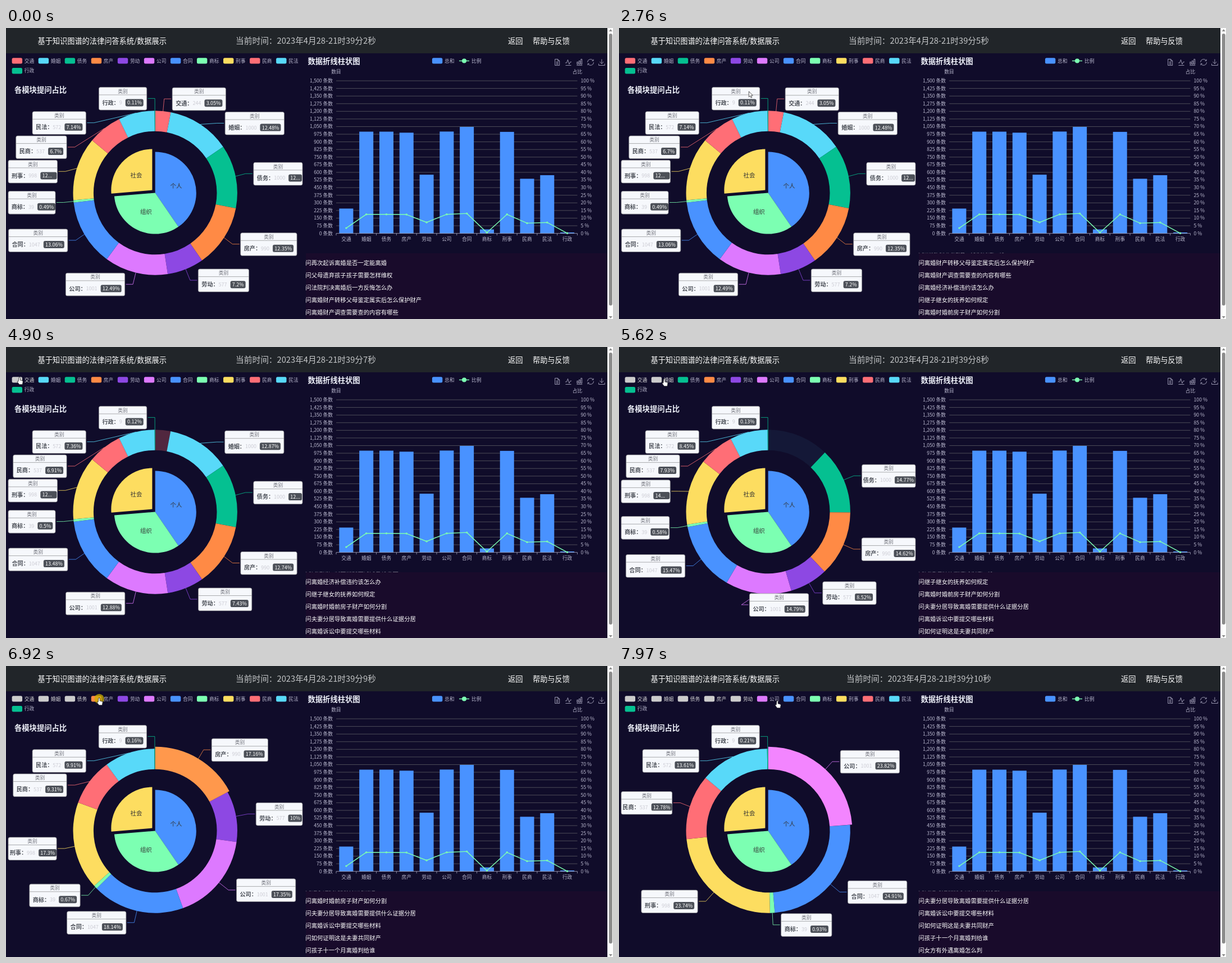
An HTML page for the animation above (8000 ms loop, 1081 by 518 pixels).

```html
<!DOCTYPE html>
<html lang="zh-CN">
<head>
<meta charset="utf-8">
<title>数据展示</title>
<style>
html, body { margin: 0; width: 100%; height: 100%; overflow: hidden; background: #100c2a; }
svg { display: block; width: 1081px; height: 518px; font-family: "Noto Sans CJK SC", "Noto Sans CJK", "Noto Sans", sans-serif; }
</style>
</head>
<body>
<svg id="stage" viewBox="0 0 1081 518">
  <defs><clipPath id="listClip"><rect x="530" y="400.5" width="540" height="118"/></clipPath></defs>
  <g id="base"></g>
  <g id="list" clip-path="url(#listClip)"></g>
  <g id="legend"></g>
  <g id="pie"></g>
  <text id="clock" x="534" y="28.4" font-size="14.7" fill="#c4c6c8" text-anchor="middle"></text>
  <g id="over"></g>
</svg>
<script>
const LOOP = 8000;
const names = '交通 婚姻 债务 房产 劳动 公司 合同 商标 刑事 民商 民法 行政'.split(' ');
const counts = [244, 1000, 1000, 990, 577, 1001, 1047, 39, 998, 537, 572, 9];
const [BLUE, MINT, YELLOW, RED, CYAN, GREEN, ORANGE, PURPLE, PINK] =
  '#4992ff #7cffb2 #fddd60 #ff6e76 #58d9f9 #05c091 #ff8a45 #8d48e3 #dd79ff'.split(' ');
const colors = [RED, CYAN, GREEN, ORANGE, PURPLE, PINK, BLUE, MINT, YELLOW, RED, CYAN, GREEN];
const AXIS = '#b9b8ce';
const questions = [
  '问再次起诉离婚是否一定能离婚', '问父母遗弃孩子孩子需要怎样维权', '问法院判决离婚后一方反悔怎么办',
  '问离婚财产转移父母鉴定属实后怎么保护财产', '问离婚财产调查需要查的内容有哪些', '问离婚经济补偿违约该怎么办',
  '问继子继女的抚养如何规定', '问离婚时婚前房子财产如何分割', '问夫妻分居导致离婚需要提供什么证据分居',
  '问离婚诉讼中要提交哪些材料', '问如何证明这是夫妻共同财产', '问孩子十一个月离婚判给谁', '问女方有外遇离婚怎么判'
];

const $ = id => document.getElementById(id);
const n2 = v => Math.round(v * 100) / 100;
const clamp = (v, a = 0, b = 1) => Math.min(b, Math.max(a, v));
const mix = (a, b, e) => a + (b - a) * e;
const inOut = p => p < .5 ? 4 * p ** 3 : 1 - (2 - 2 * p) ** 3 / 2;
const sum = list => list.reduce((a, b) => a + b, 0);

// Text placed by the vertical middle of its glyphs
const text = (x, y, size, str, fill, more = '') =>
  `<text x="${n2(x)}" y="${n2(y + size * .37)}" font-size="${size}" fill="${fill}" ${more}>${str}</text>`;
const rect = (x, y, w, h, fill, more = '') =>
  `<rect x="${n2(x)}" y="${n2(y)}" width="${n2(w)}" height="${n2(h)}" fill="${fill}" ${more}/>`;
const line = (pts, color, w = .72, more = '') =>
  `<polyline points="${pts.map(p => p.map(n2)).join(' ')}" fill="none" stroke="${color}" stroke-width="${w}" ${more}/>`;
const MID = 'text-anchor="middle"', END = 'text-anchor="end"', BOLD = 'font-weight="700"';

// ---- pie geometry, angles clockwise from the top ----
const CX = 265.7, CY = 293.5, R0 = 109.8, R1 = 146.2, LEN1 = 21.6, LEN2 = 10.8, GAP = 3.6;
const polar = (r, a) => [CX + r * Math.sin(a), CY - r * Math.cos(a)];

function sector(r0, r1, a0, a1, fill, more = '') {
  const big = a1 - a0 > Math.PI ? 1 : 0, pt = (r, a) => polar(r, a).map(n2).join(' ');
  return `<path d="M${pt(r1, a0)}A${r1} ${r1} 0 ${big} 1 ${pt(r1, a1)}L${pt(r0, a1)}` +
    (r0 ? `A${r0} ${r0} 0 ${big} 0 ${pt(r0, a0)}` : '') + `Z" fill="${fill}" ${more}/>`;
}

// Percentages with two decimals that add up to 100 (largest remainder)
function percents(values) {
  const total = sum(values), raw = values.map(v => v / total * 1e4), seats = raw.map(Math.floor);
  raw.map((v, i) => [v - seats[i], i]).sort((a, b) => b[0] - a[0])
    .slice(0, 1e4 - sum(seats)).forEach(([, i]) => seats[i]++);
  return seats.map(v => v / 100);
}

// Sector angles and label anchors once the first `off` categories are hidden
function layout(off) {
  const shown = counts.slice(off), total = sum(shown), pct = percents(shown), items = [];
  let a = 0;
  for (let i = off; i < 12; i++) {
    const a1 = a + counts[i] / total * 2 * Math.PI, mid = (a + a1) / 2;
    const dir = mid < Math.PI ? 1 : -1, [x, y] = polar(R1 + LEN1, mid);
    items[i] = { a0: a, a1, dir, x: x + dir * (LEN2 + GAP), y, pct: pct[i - off] };
    a = a1;
  }
  [1, -1].forEach(dir => spread(items.filter(it => it.dir === dir), dir));
  return items;
}

// Push overlapping labels down, then realign them on an ellipse
function spread(side, dir) {
  let moved = false, last = -99;
  side.sort((p, q) => p.y - q.y).forEach(it => {
    if (it.y < last + 43.3) { it.y = last + 43.3; moved = true; }
    last = it.y;
  });
  if (!moved) return;
  const rA = R1 + LEN1;
  [it => it.y <= CY, it => it.y > CY].forEach(half => {
    const part = side.filter(half);
    if (!part.length) return;
    const far = part.reduce((p, q) => Math.abs(q.y - CY) > Math.abs(p.y - CY) ? q : p);
    const dx = Math.abs(far.x - CX) - LEN2, dy = Math.abs(far.y - CY);
    const rB = dx < rA ? dy / Math.sqrt(1 - (dx / rA) ** 2) : rA;
    part.forEach(it => {
      const k = Math.max(0, 1 - ((it.y - CY) / rB) ** 2);
      it.x = CX + dir * (Math.sqrt(k) * rA + LEN2);
    });
  });
}

const layouts = [0, 1, 2, 3, 4, 5].map(layout);
const clicks = [4830, 5500, 6290, 7000, 7470];
// category, start, end
const hovers = [[0, 1560, 1700], [0, 4450, 4780], [1, 5200, 5500], [2, 5750, 6290], [3, 6600, 7000], [4, 7220, 7470], [5, 7640, 9000]];

const lift = (hex, k) => 'rgb(' + [1, 3, 5].map(p =>
  Math.min(255, Math.round(parseInt(hex.slice(p, p + 2), 16) * (1 + .1 * k)))) + ')';

function hoverAmount(i, t) {
  let amount = 0;
  hovers.forEach(([k, on, off]) => {
    if (k !== i || t < on) return;
    const rise = 1 - (1 - clamp((Math.min(t, off) - on) / 300)) ** 3;
    amount = Math.max(amount, rise * (1 - clamp((t - off) / 300)) ** 3);
  });
  return amount;
}

const glyphs = { '.': 2.5, '%': 8.1 };
const width = str => sum([...str].map(c => glyphs[c] || 5));

function label(i, it) {
  const pad = 6, nameW = 30.3, value = '' + counts[i];
  let per = it.pct + '%', perW = width(per) + 6.4, shift = 0;
  const full = pad * 3 + nameW + width(value) + perW;
  const room = it.dir > 0 ? 528 - it.x : it.x - 4, w = Math.min(full, room);
  const over = full - pad - w;
  if (over > 4) { per = per.slice(0, 2) + '...'; perW = w - (full - pad - perW) - 1; }
  else if (over > 0) shift = over;
  const x = it.dir > 0 ? it.x : it.x - w, y = it.y - 20.3;
  const nx = x + pad - shift, vx = nx + nameW, px = vx + width(value) + pad;
  return rect(x, y, w, 40.6, '#f6f8fc', 'rx="2.9" stroke="#8c8d8e" stroke-width=".72"') +
    line([[x, y + 13.6], [x + w, y + 13.6]], '#8c8d8e') +
    text(x + w / 2, y + 7, 8.7, '类别', '#6e7079', MID) +
    text(nx, y + 27.7, 10.1, names[i] + '：', '#4c5058', BOLD) +
    text(vx, y + 27.7, 9, value, '#ccccd4') +
    rect(px, y + 21.1, perW, 13, '#4c5058', 'rx="2.9"') +
    text(px + 3.2, y + 27.7, 9, per, '#fff');
}

function drawPie(t) {
  const k = clicks.filter(c => t >= c).length, since = t - (clicks[k - 1] || -1e4);
  const now = layouts[k], old = layouts[Math.max(0, k - 1)], e = inOut(clamp(since / 500));
  let rings = '', lines = '', labels = '';
  if (k && since < 200)
    rings += sector(R0, R1, old[k - 1].a0, old[k - 1].a1, colors[k - 1], `opacity="${n2((1 - since / 200) ** 3)}"`);
  const order = names.map((_, i) => i).slice(k).sort((a, b) => hoverAmount(a, t) - hoverAmount(b, t));
  order.forEach(i => {
    const a = old[i], b = now[i], h = hoverAmount(i, t);
    const it = { dir: b.dir, pct: b.pct };
    ['a0', 'a1', 'x', 'y'].forEach(p => it[p] = mix(a[p], b[p], e));
    const r = n2(R1 + 3.6 * h);
    rings += sector(R0, r, it.a0, it.a1, lift(colors[i], h));
    lines += line([polar(r, (it.a0 + it.a1) / 2), [it.x - it.dir * (LEN2 + GAP), it.y - .3], [it.x - it.dir * 2, it.y - .3]], colors[i], .8);
    labels += label(i, it);
  });
  $('pie').innerHTML = rings + lines + labels;
}

function drawLegend(off) {
  $('legend').innerHTML = names.map((s, i) => {
    const x = 10.6 + i % 11 * 47.05, y = i < 11 ? 58.3 : 76.2;
    return rect(x, y - 5.1, 18.4, 10.3, i < off ? '#ccc' : colors[i], 'rx="2.5"') +
      text(x + 22.1, y, 8.7, s, i < off ? '#ddd' : AXIS);
  }).join('');
}

function drawList(shift) {
  $('list').innerHTML = questions.map((q, i) =>
    i < shift - 1 || i > shift + 4 ? '' : text(533.3, 418 + 22 * (i - shift), 10.35, q, '#fff')).join('');
}

// ---- pointer ----
const path = [[1000, 420, 535], [1190, 322, 401], [1320, 318, 398], [1630, 35, 60], [1770, 53, 71], [2000, 70, 76],
  [2150, 122, 84], [2650, 235, 112], [3200, 200, 120], [3560, 179, 124], [3730, 167, 205], [3820, 166, 200],
  [4450, 20, 56], [4700, 24, 54], [4950, 24, 54], [5250, 72, 57], [5560, 73, 57], [5800, 121, 57],
  [6350, 121, 57], [6650, 166, 57], [7040, 166, 57], [7280, 213, 58], [7500, 214, 58], [7750, 278, 61], [7970, 282, 62]];
const HAND = 'M-1.2 1q0-1.5 1.2-1.5t1.2 1.5v4l3.9 1q1.3.4 1.1 1.8l-.9 5h-5.6l-3.6-4.9q.1-1.8 1.9-.6z';
const ARROW = 'M0 0v10l2.3-2.1 1.5 3.5 1.6-.7-1.5-3.4h3.1z';
const within = (t, a, b) => t >= a && t < b;

function pointer(t) {
  const i = path.findIndex(p => p[0] > t);
  if (i === 0) return null;
  if (i < 0) return path[path.length - 1].slice(1);
  const [t0, x0, y0] = path[i - 1], [t1, x1, y1] = path[i], p = (t - t0) / (t1 - t0), e = p * p * (3 - 2 * p);
  return [mix(x0, x1, e), mix(y0, y1, e)];
}

function tooltip(t) {
  if (!within(t, 3400, 3960)) return '';
  const i = t < 3760 ? 11 : 9, e = 1 - (1 - clamp((t - 3760) / 400)) ** 3;
  const x = mix(193, 181, e), y = mix(138, 219, e), row = `${names[i]}: ${counts[i]} (${layouts[0][i].pct}%)`;
  const alpha = Math.min(clamp((t - 3400) / 200), clamp((3960 - t) / 100));
  return `<g opacity="${n2(alpha)}">` +
    rect(x, y, i === 11 ? 87 : 93, 46, '#fff', `rx="2.9" stroke="${colors[i]}" stroke-width=".72"`) +
    text(x + 7.2, y + 16.2, 10.1, '类别', '#666') + text(x + 7.2, y + 31.8, 10.1, row, '#666') + '</g>';
}

function drawOver(t) {
  const at = pointer(t);
  let s = tooltip(t);
  if (at) {
    const [x, y] = at.map(n2);
    if (clicks.some(c => within(t, c - 110, c)))
      s += `<circle cx="${x}" cy="${y + 1.5}" r="8.7" fill="#c8ad00" opacity=".75"/>`;
    const hand = within(t, 1560, 1720) || within(t, 3400, 3900) || t > 4430;
    s += `<path d="${hand ? HAND : ARROW}" transform="translate(${x} ${y})" fill="#fff" stroke="#111" stroke-width=".7"/>`;
  }
  $('over').innerHTML = s;
}

// ---- still parts ----
function barChart() {
  const L = 588, W = 429.5, T = 94, B = 365.6, step = W / 12;
  const ratios = percents(counts);
  ratios[0] = 3.5; // the plotted line starts a little above the share in the pie
  let s = '';
  for (let i = 0; i <= 20; i++) {
    const y = B - (B - T) * i / 20;
    if (i) s += line([[L, y], [L + W, y]], '#4d4c58', 1);
    s += text(582, y - .3, 8.7, (i * 75).toLocaleString('en-US') + ' 条数', AXIS, END) +
      text(1023.5, y - .3, 8.7, i * 5 + ' %', AXIS);
  }
  s += text(L, 77.7, 8.7, '数目', AXIS, MID) + text(L + W, 77.7, 8.7, '占比', AXIS, MID);
  const pts = ratios.map((v, i) => [L + step * (i + .5), B - (B - T) * v / 100]);
  counts.forEach((v, i) => {
    const h = (B - T) * v / 1500;
    s += rect(pts[i][0] - 12.5, B - h, 25, h, BLUE) + text(pts[i][0], 375.3, 8.7, names[i], AXIS, MID);
  });
  s += line([[L, B], [L + W, B]], AXIS);
  for (let i = 0; i <= 12; i++) s += line([[L + step * i, B], [L + step * i, B + 3.6]], AXIS);
  s += line(pts, MINT, 1.44, 'stroke-linejoin="bevel"');
  return s + pts.map(([x, y]) => `<circle cx="${n2(x)}" cy="${n2(y)}" r="1.7" fill="${MINT}"/>`).join('');
}

function toolbox() {
  const icons = ['M-4-5.5h5l3 3v8h-8zM1-5.5v3h3M-2-.5h4M-2 1.5h4M-2 3.5h4', 'M-5.5 1h2.5l2-5.5 2.5 8 2-4h2M-5 5.5h10',
    'M-5 5.5h10M-4.5 3.5v-4h2v4zM-1 3.5v-6h2v6zM2.5 3.5v-9h2v9z',
    'M-5.5 0a5.5 5.5 0 0 1 10.2-2.8M5.5 0a5.5 5.5 0 0 1-10.2 2.8M5-5.3v2.7h-2.7M-5 5.3v-2.7h2.7',
    'M0-5.5v8M-3.5-1l3.5 3.6 3.5-3.6M-5.3 2.5v3h10.6v-3'];
  return icons.map((d, i) =>
    `<path d="${d}" transform="translate(${981.7 + i * 19.8} 61)" fill="none" stroke="${AXIS}" stroke-width=".8"/>`).join('');
}

function innerPie() {
  const cut = [0, 145.6, 265.2, 360].map(d => d * Math.PI / 180), r = 73.1;
  return sector(0, r, cut[0], cut[1], BLUE) + sector(0, r, cut[1], cut[2], MINT) +
    sector(0, r, cut[2], cut[3] - 1e-4, YELLOW, 'transform="translate(-5.3 -4.9)"') +
    text(303, 281, 10.4, '个人', '#333', MID) + text(249.3, 327, 10.4, '组织', '#333', MID) +
    text(232, 262, 10.4, '社会', '#333', MID);
}

$('base').innerHTML =
  rect(0, 0, 1081, 518, '#100c2a') + rect(0, 0, 1071, 45, '#212529') +
  rect(534, 401, 537, 117, '#190b2b') +
  text(56.5, 22.7, 13.2, '基于知识图谱的法律问答系统/数据展示', '#fff') +
  text(894, 22.7, 13.3, '返回', '#fff') + text(938, 22.7, 13.2, '帮助与反馈', '#fff') +
  text(15, 110.5, 13.3, '各模块提问占比', '#eef1fa', BOLD) +
  text(537.5, 59, 13.3, '数据折线柱状图', '#eef1fa', BOLD) +
  rect(758.9, 53.2, 18.4, 10.3, BLUE, 'rx="2.5"') + text(781, 58.3, 8.7, '总和', AXIS) +
  line([[807, 58.5], [825, 58.5]], MINT, 1.44) + `<circle cx="816" cy="58.5" r="4" fill="${MINT}"/>` +
  text(829, 58.3, 8.7, '比例', AXIS) + toolbox() + barChart() + innerPie() +
  rect(1071, 0, 10, 518, '#fcfcfc') + rect(1073.8, 10, 6, 484, '#8b8b8b', 'rx="3"') +
  '<path d="M1073.8 6l3-4 3 4zM1073.8 513l3 4 3-4z" fill="#8b8b8b"/>';

// ---- playback ----
const last = {};
function update(key, value, draw) {
  if (last[key] === value) return;
  last[key] = value;
  draw(value);
}

function render(t) {
  update('clock', t < 420 ? 2 : Math.min(10, 3 + Math.floor((t - 420) / 960)),
    s => $('clock').textContent = `当前时间：2023年4月28-21时39分${s}秒`);
  update('list', clamp(Math.floor((t - 190) / 975) + 1, 0, 8), drawList);
  update('legend', clicks.filter(c => t >= c).length, drawLegend);
  drawPie(t);
  drawOver(t);
}

const start = performance.now();
function tick() {
  render((performance.now() - start) % LOOP);
  requestAnimationFrame(tick);
}
tick();
</script>
</body>
</html>
```
